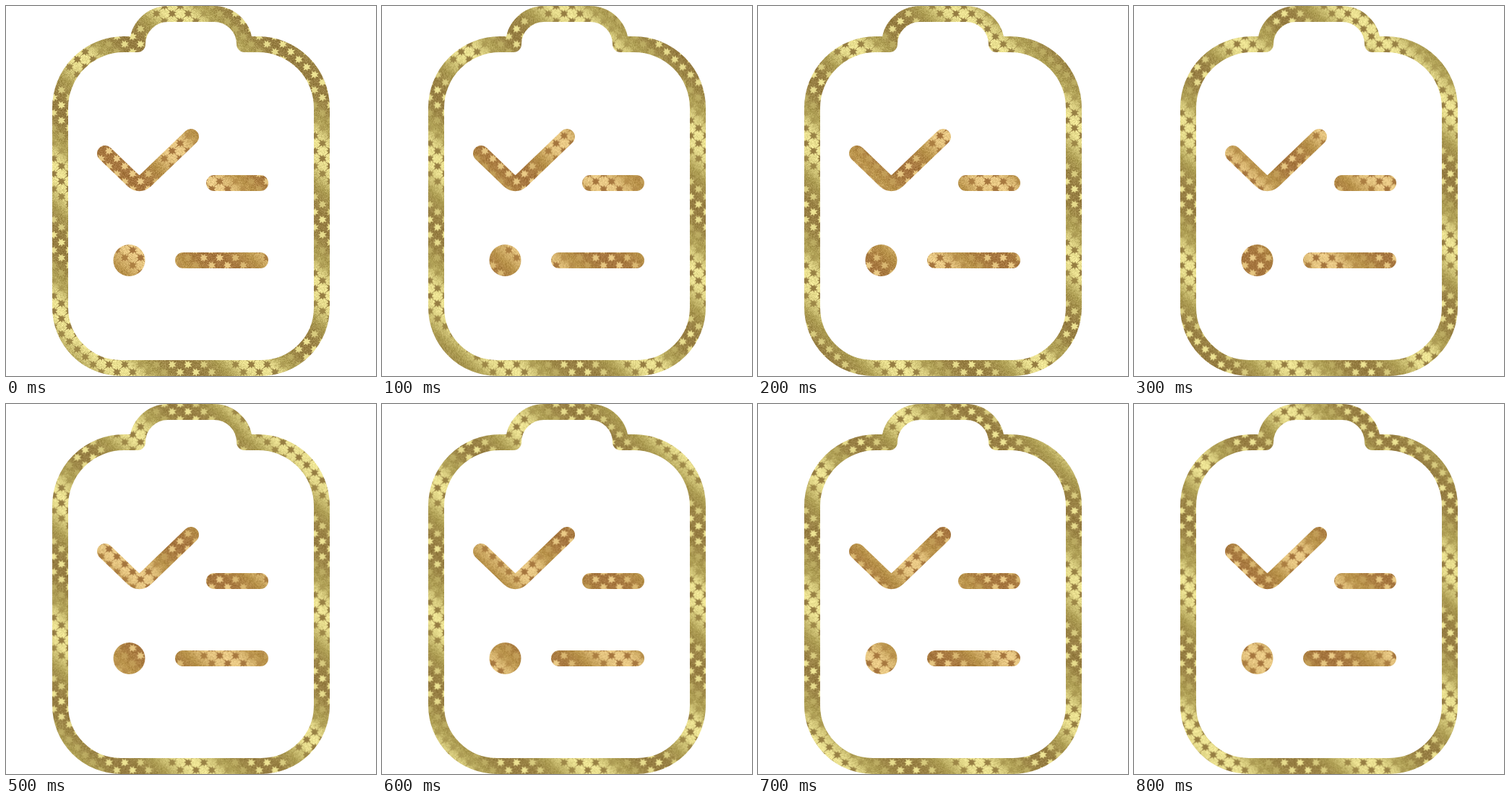
An HTML page with a canvas that plays this animation: 512 px wide and 512 px high, repeating every 0.9 s.

```html
<!DOCTYPE html>
<html lang="en">
<head>
<meta charset="utf-8">
<title>Golden checklist</title>
<style>
  html, body { margin: 0; width: 100%; height: 100%; overflow: hidden; background: #fff; }
  canvas { display: block; width: 512px; height: 512px; }
</style>
</head>
<body>
<canvas id="stage" width="512" height="512"></canvas>
<script>
const ctx = document.getElementById('stage').getContext('2d');
const TILE_W = 197, TILE_H = 190, CELLS = 9;
const STEP_MS = 100, STEPS = 9, BRIGHT = 354 / TILE_H;

const OLIVE = { dark: [150, 125, 66], mid: [174, 158, 84], light: [238, 228, 148] };
const BRONZE = { dark: [165, 117, 62], mid: [184, 146, 74], light: [236, 204, 136] };

function seeded(seed) {
  return () => {
    seed = (seed * 1664525 + 1013904223) >>> 0;
    return seed / 4294967296;
  };
}

// 1 in the middle of a bright diagonal band, 0 in the middle of a dark one
function glow(x, y) {
  const turn = y / TILE_H - x / TILE_W - BRIGHT;
  return 0.5 + 0.5 * Math.cos(2 * Math.PI * turn);
}

const blend = (a, b, k) => a.map((v, i) => v + (b[i] - v) * k);
const css = (rgb, alpha = 1) => `rgba(${rgb.map(Math.round).join(',')},${alpha})`;

function shade({ dark, mid, light }, w) {
  return w < 0.5 ? blend(dark, mid, w * 2) : blend(mid, light, w * 2 - 1);
}

function star(g, x, y, radius, turn) {
  const points = 7;
  g.beginPath();
  for (let i = 0; i < points * 2; i++) {
    const r = i % 2 ? radius * 0.48 : radius * (i % 4 ? 0.85 : 1);
    const a = turn + i * Math.PI / points;
    g.lineTo(x + r * Math.cos(a), y + r * Math.sin(a));
  }
  g.closePath();
  g.fill();
}

function foil(gold) {
  const tile = document.createElement('canvas');
  tile.width = TILE_W;
  tile.height = TILE_H;
  const g = tile.getContext('2d');
  const img = g.createImageData(TILE_W, TILE_H);
  const rand = seeded(17);
  for (let y = 0, p = 0; y < TILE_H; y++) {
    for (let x = 0; x < TILE_W; x++, p += 4) {
      const grain = (rand() + rand() - 1) * 26;
      const c = shade(gold, glow(x, y));
      for (let i = 0; i < 3; i++) img.data[p + i] = c[i] + grain;
      img.data[p + 3] = 255;
    }
  }
  g.putImageData(img, 0, 0);

  const dx = TILE_W / CELLS, dy = TILE_H / CELLS;
  for (let row = 0; row <= CELLS * 2; row++) {
    for (let col = 0; col <= CELLS; col++) {
      const x = (col + (row % 2) / 2) * dx;
      const y = row * dy / 2;
      const w = glow(x, y);
      const tone = shade(gold, 1 - w);
      // fine creases split the bright ground into petals
      g.strokeStyle = css(tone, Math.max(0, w - 0.4));
      g.lineWidth = 0.9;
      g.beginPath();
      g.moveTo(x - dx / 2, y - dy / 2);
      g.lineTo(x + dx / 2, y + dy / 2);
      g.moveTo(x + dx / 2, y - dy / 2);
      g.lineTo(x - dx / 2, y + dy / 2);
      g.stroke();
      g.fillStyle = css(tone, Math.min(1, Math.abs(w - 0.5) * 4));
      star(g, x, y, 6.6, 0.5);
    }
  }
  return ctx.createPattern(tile, 'repeat');
}

const board = new Path2D();
board.moveTo(75, 141);
board.arcTo(75, 53, 163, 53, 88);
board.lineTo(182, 53);
board.arcTo(182, 11, 224, 11, 42);
board.lineTo(288, 11);
board.arcTo(330, 11, 330, 53, 42);
board.lineTo(349, 53);
board.arcTo(437, 53, 437, 141, 88);
board.lineTo(437, 417);
board.arcTo(437, 501, 353, 501, 84);
board.lineTo(159, 501);
board.arcTo(75, 501, 75, 417, 84);
board.closePath();

const marks = new Path2D(
  'M137 204L176 241.5Q184.5 249 193 241.5L256 181M288 245H352M245 352H352');
const dot = new Path2D();
dot.arc(170.5, 352, 22, 0, 2 * Math.PI);

const olive = foil(OLIVE), bronze = foil(BRONZE);
ctx.lineWidth = 22;
ctx.lineCap = ctx.lineJoin = 'round';

function draw(now) {
  const k = Math.floor(now / STEP_MS) % STEPS / STEPS;
  const shift = new DOMMatrix().translate(k * TILE_W / 2, -k * TILE_H / 2);
  olive.setTransform(shift);
  bronze.setTransform(shift);

  ctx.fillStyle = '#fff';
  ctx.fillRect(0, 0, 512, 512);
  ctx.strokeStyle = olive;
  ctx.stroke(board);
  ctx.strokeStyle = ctx.fillStyle = bronze;
  ctx.stroke(marks);
  ctx.fill(dot);
}

const start = performance.now();
function tick() {
  draw(performance.now() - start);
  requestAnimationFrame(tick);
}
tick();
</script>
</body>
</html>
```
